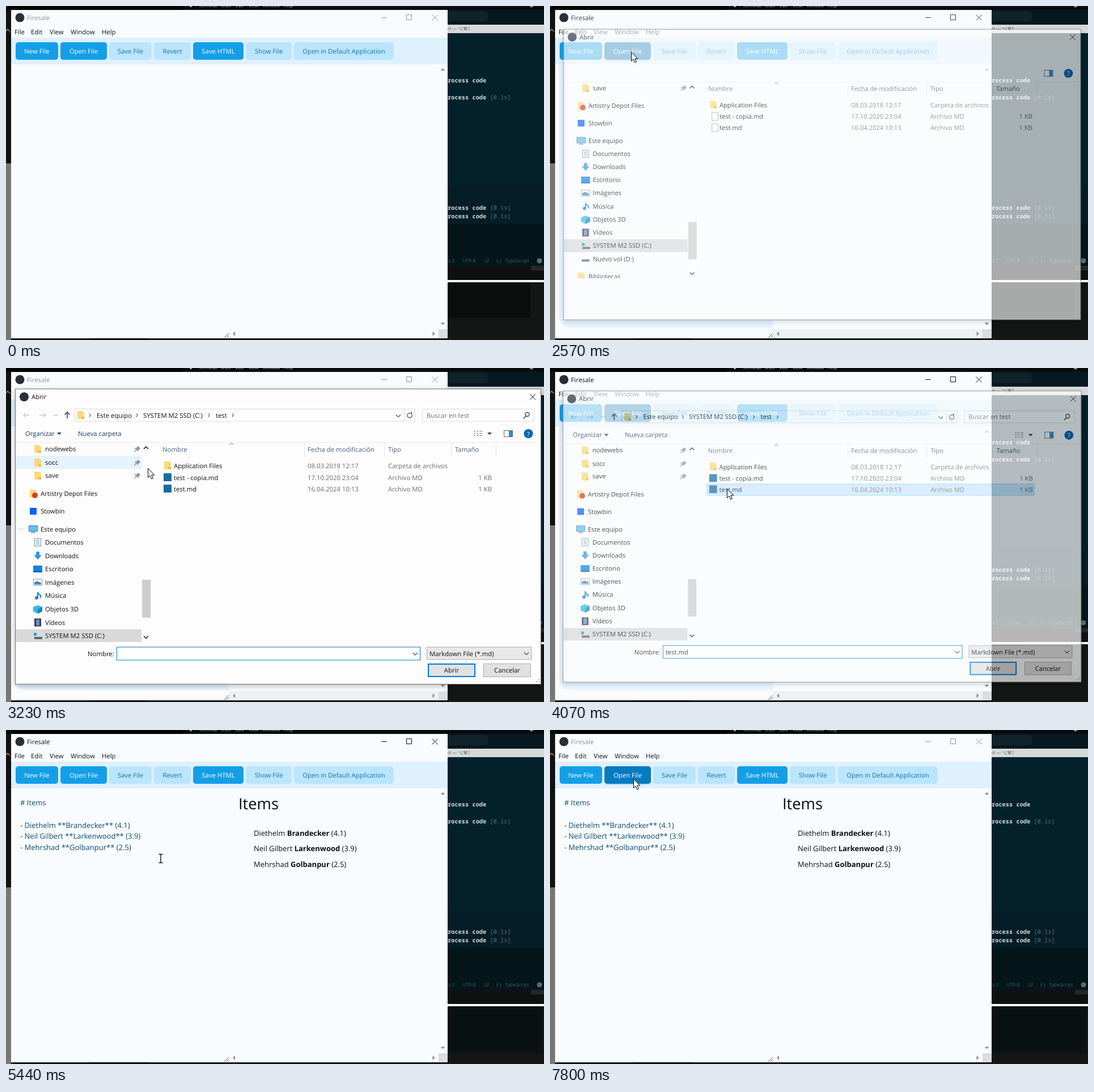
These frames come from a looping animation (949 by 590 pixels, 8 s). An HTML page:

```html
<!DOCTYPE html>
<html lang="en">
<head>
<meta charset="utf-8">
<title>Firesale</title>
<style>
  html, body { margin: 0; width: 100%; height: 100%; overflow: hidden; background: #111; }
  svg { display: block; width: 949px; height: 590px; }
  text { font: 11.35px "Open Sans", "Noto Sans", sans-serif; text-rendering: geometricPrecision; white-space: pre; }
  .doc { font-size: 13px; }
  .heading { font-size: 27.3px; }
  .mono { font: bold 10.35px "Noto Sans Mono", "DejaVu Sans Mono", monospace; }
  .tiny { font-size: 8px; }
  .status { font-size: 8.8px; }
  #dialog { filter: drop-shadow(0 3px 5px rgba(0, 0, 0, .25)); }
</style>
</head>
<body>
<svg id="stage" viewBox="0 0 949 590"></svg>
<script>
const LOOP = 8000;

const text = (x, y, s, fill = '#111', extra = '') => `<text x="${x}" y="${y}" fill="${fill}" ${extra}>${s}</text>`;
const rect = (x, y, w, h, fill, extra = '') => `<rect x="${x}" y="${y}" width="${w}" height="${h}" fill="${fill}" ${extra}/>`;
const circle = (x, y, r, fill, extra = '') => `<circle cx="${x}" cy="${y}" r="${r}" fill="${fill}" ${extra}/>`;
const shape = (d, fill) => `<path d="${d}" fill="${fill}"/>`;
const line = (d, stroke, width = 1) => `<path d="${d}" fill="none" stroke="${stroke}" stroke-width="${width}"/>`;
const group = (id, body, extra = '') => `<g id="${id}" ${extra}>${body}</g>`;
const stroke = color => `stroke="${color}"`;
const cross = (x, y, color) => line(`M${x - 5} ${y - 5}l10 10m0-10l-10 10`, color);
const chevron = (x, y, dx, dy, color = '#555', width = 1.3) =>
  line(dx ? `M${x - dx} ${y - 3}l${2 * dx} 3l${-2 * dx} 3` : `M${x - 4} ${y - dy}l4 ${2 * dy}l4 ${-2 * dy}`, color, width);

// Desktop behind the window
function desktop() {
  const log = (y, timed) => text(779, y, 'rocess code', '#d3dcdd', 'class="mono"') +
    (timed ? text(853.5, y, '[0.1s]', '#5b6f75', 'class="mono" style="font-weight:400"') : '');
  const menu = [[340, 'Terminal'], [379, 'Shell'], [405, 'Edit'], [428, 'View'], [453, 'Window'], [489, 'Help']];
  return rect(0, 0, 949, 590, '#141515') + rect(0, 0, 312, 7, '#020202') + rect(312, 0, 637, 6, '#070b0d') +
    circle(326, 0, 2, '#ccc') + menu.map(([x, s]) => text(x, 1.5, s, '#bbb', 'class="tiny"')).join('') +
    shape('M923 0h8l-4 3z', '#999') +
    rect(0, 7, 9, 271, '#111214') + rect(0, 278, 9, 312, '#777') + chevron(3, 43, 0, -2, '#999') +
    rect(9, 587, 940, 3, '#161616') + rect(147, 587, 102, 3, '#000') +
    rect(779, 6, 170, 27, '#07171f') + rect(770, 9, 80, 18, '#10232b', 'rx="4"') +
    rect(779, 33, 170, 15, '#d6d9da') + text(779, 43, 'rt — ⌥⌘1', '#555', 'class="tiny" font-weight="600"') +
    rect(779, 48, 170, 270, '#04212b') + rect(779, 318, 170, 67, '#041d26') +
    rect(779, 385, 170, 75, '#05161b') + rect(779, 460, 170, 24, '#0f1111') + rect(926, 459, 23, 8, '#252829') +
    log(135) + log(165, 1) + log(360, 1) + log(375, 1) +
    [[780, 's 2'], [805, 'UTF-8'], [844, 'LF'], [865, '{ }'], [880, 'TypeScript']]
      .map(([x, s]) => text(x, 453, s, '#4a5c62', 'class="status"')).join('') +
    circle(941, 450, 4.5, '#5d6b70') +
    rect(779, 484, 170, 4, '#fff') + '<rect id="panel" x="779" y="488"/>';
}

const buttons = [
  [17, 75, 'New File', 1], [96, 82, 'Open File', 1], [182, 75, 'Save File'], [261, 65, 'Revert'],
  [330, 89, 'Save HTML', 1], [423, 81, 'Show File'], [508, 176, 'Open in Default Application']
];
const people = [['Diethelm', 'Brandecker', '4.1'], ['Neil Gilbert', 'Larkenwood', '3.9'], ['Mehrshad', 'Golbanpur', '2.5']];

function appWindow() {
  const button = ([x, w, label, enabled]) =>
    rect(x, 64, w, 31, enabled ? '#139fe8' : '#bae5fd', `rx="5" ${label === 'Open File' ? 'id="open"' : ''}`) +
    text(x + w / 2, 84, label, enabled ? '#fff' : '#1b73aa', `text-anchor="middle" ${enabled ? 'font-weight="500"' : ''}`);
  const person = ([first, last, score], i) =>
    text(25, 172.5 + 19.7 * i, `- ${first} **${last}** (${score})`, '#0c4a6e', 'class="doc"') +
    text(437, 186.5 + 27.5 * i, `${first} <tspan font-weight="700">${last}</tspan> (${score})`, '#0b0f14', 'class="doc"');
  return rect(9, 7, 770, 580, '#f8fcff') +
    circle(24.5, 20.5, 8, '#2b2e3a') +
    group('caption', '<text id="title" x="37" y="25">Firesale</text>' +
      '<path id="controls" fill="none" d="M662 20.5h10M706.5 15.5h9v9h-9zM751.5 15.5l10 10m0-10l-10 10"/>') +
    [[15, 'File'], [44, 'Edit'], [77, 'View'], [114, 'Window'], [169, 'Help']].map(([x, s]) => text(x, 50, s)).join('') +
    rect(9, 56, 770, 47, '#dff0fe') +
    rect(96, 66, 82, 31, '#0b4a78', 'id="lift" rx="5" opacity=".15"') +
    buttons.map(button).join('') +
    group('pane', line('M24 103V548Q24 561 38 561H393', '#e6f4ff', 16) + rect(393, 571, 370, 16, '#eef1f3')) +
    shape('M766.5 114h8l-4-4zM766.5 559.5h8l-4 4zM404 575v8l-4-4zM752.5 575v8l4-4z', '#8b8d8f') +
    rect(763, 571, 16, 16, '#dcdddf') + line('M385 586l8-8m-4 8l4-4', '#555') +
    group('content', text(25, 133, '# Items', '#0c4a6e', 'class="doc"') +
      text(410, 140, 'Items', '#0b0f14', 'class="heading"') + people.map(person).join(''));
}

// Small icons, each placed by its centre
const icons = {
  folder: (x, y) => shape(`M${x - 6} ${y - 7}h9l1 2h2v12h-12z`, '#fbd97a') + rect(x + 1, y + 3, 5, 4, '#e9b94a'),
  art: (x, y) => icons.folder(x, y) + circle(x + 3, y + 3, 5, '#da3b26'),
  stow: (x, y) => rect(x - 6, y - 6, 12, 12, '#0a61fe'),
  pc: (x, y) => rect(x - 7.5, y - 6, 15, 10, '#5cc1f5', stroke('#5a7f98')) + rect(x - 4, y + 5, 8, 2, '#8a9ba6'),
  doc: (x, y) => rect(x - 5.5, y - 6.5, 11, 13, '#fff', stroke('#7c8b96')) + line(`M${x - 3} ${y - 3}h6m-6 3h6m-6 3h6`, '#3489c5'),
  down: (x, y) => shape(`M${x - 3} ${y - 7}h6v6h4l-7 8l-7-8h4z`, '#3a96dd'),
  desk: (x, y) => rect(x - 8, y - 6, 16, 12, '#0d84d8') + rect(x - 8, y + 4, 16, 2, '#0a5c9c'),
  image: (x, y) => rect(x - 7.5, y - 5.5, 15, 11, '#fff', stroke('#8d9aa3')) + shape(`M${x - 6} ${y + 4}v-4l5-2l7 3v3z`, '#3b88b8'),
  music: (x, y) => line(`M${x} ${y + 4}v-10q1 4 4 5t0 5`, '#1683d8', 2) + circle(x - 2, y + 4, 3, '#1683d8'),
  cube: (x, y) => shape(`M${x} ${y - 7}l8 3v8l-8 4l-8-4v-8z`, '#36b9e6') + shape(`M${x} ${y}l8-4v8l-8 4z`, '#1489ba'),
  video: (x, y) => rect(x - 6, y - 7, 12, 14, '#3b3f45') + rect(x - 3, y - 5, 6, 10, '#6b8fc0'),
  drive: (x, y) => rect(x - 7, y - 5, 5, 5, '#1a9be8') + rect(x - 6, y + 2, 14, 4, '#5d6468'),
  disk: (x, y) => rect(x - 7, y + 1, 14, 4, '#5d6468'),
  pin: (x, y) => line(`M${x - 5} ${y + 5}l4-4M${x - 4} ${y - 2}l6 6`, '#8a949c', 1.3) +
    shape(`M${x - 2} ${y - 1}l4-4l4 4l-4 4z`, '#8a949c')
};
const places = [
  [143, 'folder', 'nodewebs'], [167, 'folder', 'socc'], [190, 'folder', 'save'],
  [222, 'art', 'Artistry Depot Files'], [253, 'stow', 'Stowbin'], [284.5, 'pc', 'Este equipo'],
  [308, 'doc', 'Documentos'], [331.5, 'down', 'Downloads'], [355, 'desk', 'Escritorio'], [378.5, 'image', 'Imágenes'],
  [402, 'music', 'Música'], [426, 'cube', 'Objetos 3D'], [449.5, 'video', 'Vídeos'], [473, 'drive', 'SYSTEM M2 SSD (C:)'],
  [496.5, 'disk', 'Nuevo vol (D:)'], [528, 'folder', 'Bibliotecas']
];

function dialog() {
  const place = ([y, icon, label]) => {
    const parent = ['art', 'stow', 'pc'].includes(icon) || label === 'Bibliotecas';
    return icons[icon](parent ? 48 : 56, y) + text(parent ? 61 : 69, y + 4, label) + (y < 200 ? icons.pin(231, y) : '');
  };
  const file = (y, name, date, kind, size) => text(296, y, name) + text(532, y, date, '#6d6d6d') +
    text(674, y, kind, '#6d6d6d') + (size ? text(857, y, size, '#6d6d6d', 'text-anchor="end"') : '');
  const fileIcon = y => rect(282.5, y - 6.5, 11, 14, '#fff', stroke('#9a9a9a'));
  const appIcon = y => rect(278, y - 7, 14, 14, '#176d9e');

  const frame = rect(16.5, 37, 927, 521.5, '#fdfdfd', stroke('#707476')) + circle(32, 51, 8, '#2b2e3a') +
    text(45, 55, 'Abrir') + cross(929, 51, '#222') +
    rect(878.5, 110.5, 15, 11, '#fff', stroke('#56718a')) + rect(887, 111, 6, 10, '#2b8ad0') +
    circle(921.5, 116, 8, '#0c63b0') + text(921.5, 120.5, '?', '#fff', 'text-anchor="middle" font-weight="700"');
  const list = line('M17 131.5H943', '#ececec') + line('M526.5 132v25M667.5 132v25M785.5 132v25M864.5 132v25', '#e3e3e3') +
    chevron(398, 134, 0, -1.5, '#777', 1) +
    [[276, 'Nombre'], [532, 'Fecha de modificación'], [674, 'Tipo'], [792, 'Tamaño']].map(([x, s]) => text(x, 148, s, '#4c607a')).join('') +
    '<rect id="row" x="273.5" y="203.5" width="586" height="20.5"/>' +
    icons.folder(285, 172) + group('plainIcons', fileIcon(193) + fileIcon(213)) + group('fileIcons', appIcon(193) + appIcon(213)) +
    file(177, 'Application Files', '08.03.2018 12:17', 'Carpeta de archivos') +
    file(197.5, 'test - copia.md', '17.10.2020 23:04', 'Archivo MD', '1 KB') +
    file(218, 'test.md', '16.04.2024 10:13', 'Archivo MD', '1 KB');
  const sidebar = `<clipPath id="side"><rect x="17" y="132" width="240" height="352"/></clipPath>` +
    group('sidebar', group('places', rect(17, 155, 222, 23.5, '#e5f3ff', 'id="hover"') +
      rect(17, 461.5, 222, 23, '#d9d9d9') + places.map(place).join('') +
      group('expander', chevron(27, 284.5, 0, 1.5, '#bbb', 1))), 'clip-path="url(#side)"') +
    chevron(247, 141, 0, -2, '#444', 1.8) + chevron(247, 475.5, 0, 2, '#444', 1.8) +
    rect(240, 374, 15, 67, '#cdcdcd', 'id="thumb"');
  const nav = line('M41 83.5H31l4-4m-4 4l4 4M59 83.5h11l-4-4m4 4l-4 4', '#c9c9c9', 1.3) + chevron(88, 83.5, 0, 1, '#aaa', 1) +
    line('M108 89V78l-4.5 4.5m4.5-4.5l4.5 4.5', '#444', 1.6) +
    rect(121.5, 72.5, 600, 21.5, '#fff', stroke('#d9d9d9')) + icons.folder(132, 83) +
    [148, 231, 358, 400].map(x => chevron(x, 83.5, 1, 0)).join('') +
    text(160, 87.5, 'Este equipo') + text(242, 87.5, 'SYSTEM M2 SSD (C:)') + text(370, 87.5, 'test') +
    chevron(692, 84.5, 0, 2) + line('M702.5 73v21', '#d9d9d9') + line('M715.5 81.5a4.2 4.2 0 1 1-4-1.8h4v-2.5v5', '#555', 1.3) +
    rect(734.5, 72.5, 197, 21.5, '#fff', stroke('#d9d9d9')) + text(742, 87.5, 'Buscar en test', '#6d6d6d') +
    circle(919.5, 82, 3.5, 'none', 'stroke="#444" stroke-width="1.4"') + line('M917 85l-4 4', '#444', 1.6) +
    text(34, 120, 'Organizar', '#1e395b') + shape('M90 114h8l-4 4z', '#1e395b') + text(127, 120, 'Nueva carpeta', '#1e395b') +
    line('M825 111.5h3m2 0h3m2 0h5M825 115.5h3m2 0h3m2 0h5M825 119.5h3m2 0h3m2 0h5', '#777') + shape('M849 114h8l-4 4z', '#1e395b');
  const footer = text(144, 508.5, 'Nombre:') + rect(195.5, 493, 535, 23, '#fff', stroke('#0078d7')) +
    group('fileName', text(200, 508.5, 'test.md')) + chevron(722, 505, 0, 2) +
    rect(742.5, 493, 184.5, 22, '#e8e8e8', stroke('#adadad')) + text(747, 508.5, 'Markdown File (*.md)') + chevron(918, 504.5, 0, 2) +
    rect(745, 523, 82, 22, '#e1e1e1', 'stroke="#0078d7" stroke-width="2"') + text(786, 538, 'Abrir', '#111', 'text-anchor="middle"') +
    rect(842.5, 522.5, 83, 23, '#e1e1e1', stroke('#adadad')) + text(884, 538, 'Cancelar', '#111', 'text-anchor="middle"') +
    [[939, 549], [939, 553], [935, 553]].map(([x, y]) => rect(x, y, 2, 2, '#bbb')).join('');
  return frame + list + sidebar + group('chrome', nav + footer);
}

document.getElementById('stage').innerHTML = desktop() + appWindow() + group('dialog', dialog()) +
  group('arrow', '<path d="M.5 .5v16l3.7-3.5l2.6 6l2.6-1.1l-2.6-5.9h5z" fill="#fff" stroke="#000"/>') +
  group('beam', line('M-3.5-7.5h3l.5.5l.5-.5h3M0-7V7M-3.5 7.5h3l.5-.5l.5.5h3', '#111', 1.4));

// Tracks hold each value until the next time
const cursorTrack = [
  [0], [810, 744, 568, 'arrow'], [930, 556, 434, 'arrow'], [1060, 330, 265, 'beam'], [1180, 176, 152, 'beam'],
  [1330, 154, 111, 'beam'], [1480, 146, 88, 'arrow'], [1600, 143, 81, 'arrow'],
  [3080, 188, 121, 'arrow'], [3230, 250, 177, 'arrow'], [3370, 268, 190, 'arrow'], [3490, 300, 210, 'arrow'],
  [3620, 312, 213, 'arrow'], [4310, 312, 217, 'beam'], [5440, 273, 227, 'beam'], [5560, 277, 319, 'beam'],
  [5710, 499, 317, 'arrow'], [6690, 370, 275, 'beam'], [6810, 205, 219, 'beam'], [6960, 167, 134, 'beam'],
  [7110, 155, 99, 'arrow'], [7260, 148, 88, 'arrow'], [7380, 147, 86, 'arrow']
];
const openTrack = [
  [0, '#139fe8'], [1480, '#0a92d8'], [1600, '#0284c7'], [1880, '#0571b3'], [4310, '#139fe8'],
  [7260, '#0a92d8'], [7380, '#0284c7'], [7800, '#047ac0']
];
const titleTrack = [
  [0, '#929496'], [1880, '#111'], [2020, '#929496'], [2570, '#444'], [2690, '#929496'], [4070, '#111'], [7800, '#929496']
];
// time, opacity, scale
const dialogTrack = [[0, 0, 1], [2570, .65, .984], [2690, .95, .997], [2810, 1, 1], [4070, .7, .986], [4190, .27, .969], [4310, 0, 1]];

const at = (track, t) => track.findLast(key => key[0] <= t);
const $ = id => document.getElementById(id);
const set = (id, attrs) => { for (const name in attrs) $(id).setAttribute(name, attrs[name]); };
const show = (id, on) => set(id, { display: on ? 'inline' : 'none' });

function render(t) {
  const [, x, y, kind] = at(cursorTrack, t);
  for (const id of ['arrow', 'beam']) {
    show(id, id === kind);
    if (id === kind) set(id, { transform: `translate(${x} ${y})` });
  }

  const openColor = at(openTrack, t)[1], titleColor = at(titleTrack, t)[1];
  set('open', { fill: openColor });
  show('lift', openColor !== openTrack[0][1]);
  set('title', { fill: titleColor });
  set('controls', { stroke: titleColor });
  show('content', t >= 4310);
  set('panel', t < 4310 ? { width: 146, height: 63, fill: '#0b0c0c' } : { width: 167, height: 82, fill: '#0a1113' });

  const [, opacity, scale] = at(dialogTrack, t);
  show('dialog', opacity > 0);
  show('pane', opacity > 0);
  set('dialog', { opacity, transform: `translate(480 297) scale(${scale}) translate(-480 -297)` });
  const loaded = t >= 2810, inSidebar = t >= 3230 && t < 3370;
  show('chrome', loaded);
  show('fileIcons', loaded);
  show('plainIcons', !loaded);
  set('places', { transform: `translate(0 ${loaded ? 0 : -47.5})` });
  set('thumb', { y: loaded ? 374 : 383 });
  show('hover', inSidebar);
  show('expander', t >= 3230 && t < 3620);
  const selected = t >= 3620;
  show('row', t >= 3490);
  set('row', { fill: selected ? '#cce8ff' : '#e5f3ff', stroke: selected ? '#99d1ff' : 'none' });
  show('fileName', selected);
}

function tick() {
  render(performance.now() % LOOP);
  requestAnimationFrame(tick);
}
tick();
</script>
</body>
</html>
```
